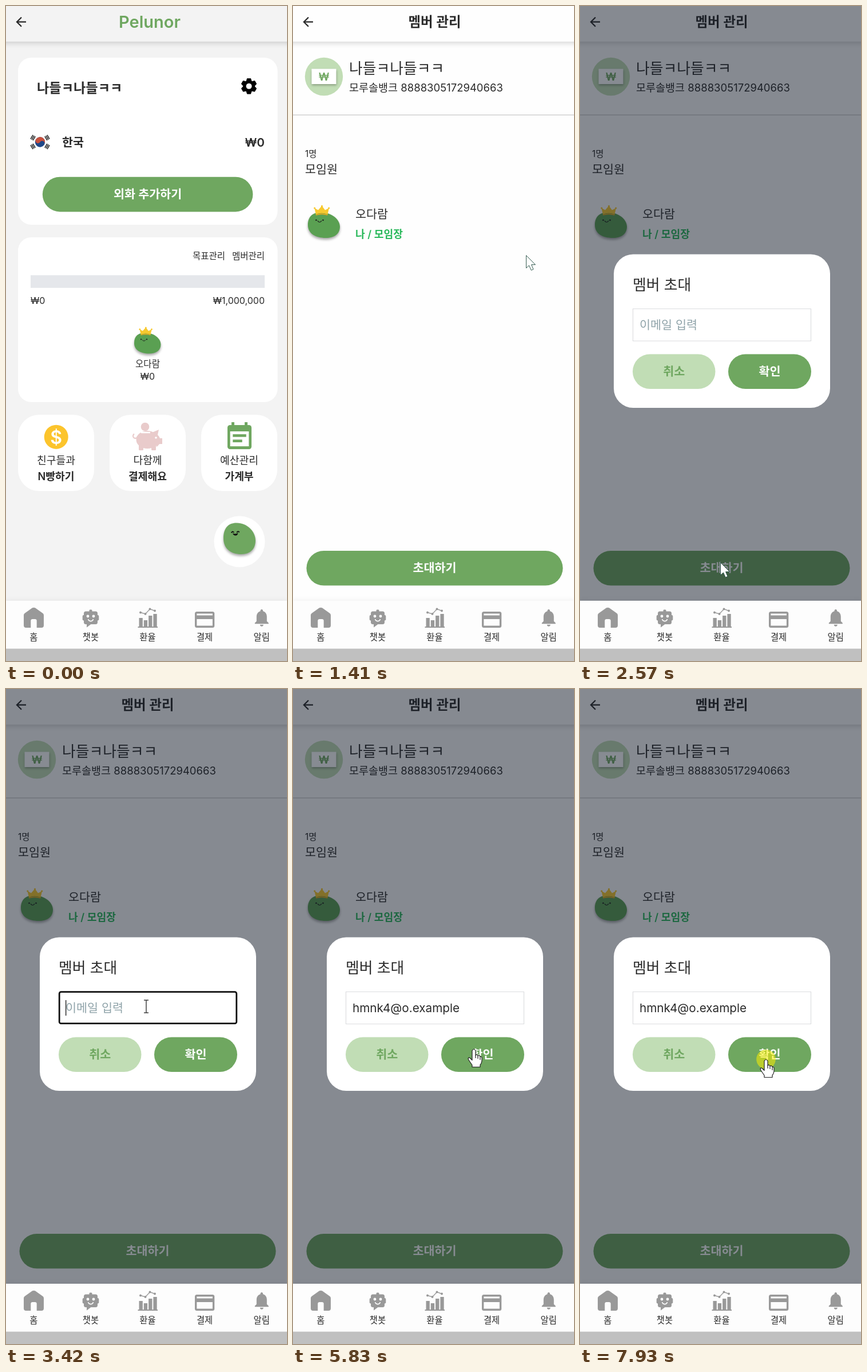
Recreate the animation shown at these times as an HTML page with a canvas. Size 491x1141 px, loop 8000 ms.

```html
<!DOCTYPE html>
<html lang="ko">
<head>
<meta charset="utf-8">
<title>멤버 초대</title>
<style>
html, body { margin: 0; width: 100%; height: 100%; overflow: hidden; background: #fff; }
canvas { display: block; width: 491px; height: 1141px; }
</style>
</head>
<body>
<canvas id="stage"></canvas>
<script>
const W = 491, H = 1141, LOOP = 8000;
const canvas = document.getElementById('stage');
const c = canvas.getContext('2d');
const dpr = window.devicePixelRatio || 1;
canvas.width = W * dpr;
canvas.height = H * dpr;

const INK = '#2b2b2b', GREEN = '#6fa760', PALE = '#c1ddb5', GREY = '#999', GOLD = '#fcc42c';
const GROUP = '나들ㅋ나들ㅋㅋ', MEMBER = '오다람', EMAIL = 'hmnk4@o.example';
const FONT = 'Inter, "Noto Sans CJK KR", "Noto Sans CJK", sans-serif';

// Text is placed by the vertical middle of its glyphs.
function text(str, x, y, size, { bold = false, color = INK, align = 'left' } = {}) {
  c.font = `${bold ? 600 : 400} ${size}px ${FONT}`;
  c.textAlign = align;
  c.fillStyle = color;
  c.fillText(str, x, y + size * 0.37);
}

function rect(x, y, w, h, color, r = 0) {
  c.beginPath();
  c.roundRect(x, y, w, h, r);
  c.fillStyle = color;
  c.fill();
}

function circle(x, y, r, color) {
  c.beginPath();
  c.arc(x, y, r, 0, Math.PI * 2);
  c.fillStyle = color;
  c.fill();
}

function line(points, color, width) {
  c.beginPath();
  points.forEach(([x, y]) => c.lineTo(x, y));
  c.strokeStyle = color;
  c.lineWidth = width;
  c.stroke();
}

function shape(path, x, y, sx, sy, fill, stroke, width = 1) {
  c.save();
  c.translate(x, y);
  c.scale(sx, sy);
  const p = new Path2D(path);
  c.fillStyle = fill;
  c.fill(p);
  if (stroke) {
    c.strokeStyle = stroke;
    c.lineWidth = width;
    c.lineJoin = 'round';
    c.stroke(p);
  }
  c.restore();
}

function shadowed(color, blur, dy, draw) {
  c.save();
  c.shadowColor = color;
  c.shadowBlur = blur * dpr;
  c.shadowOffsetY = dy * dpr;
  draw();
  c.restore();
}

function pill(x, y, w, h, color, label, ink = '#fff') {
  rect(x, y, w, h, color, h / 2);
  text(label, x + w / 2, y + h / 2 - 0.5, 20.7, { bold: true, color: ink, align: 'center' });
}

function header(bg) {
  shadowed('rgba(0,0,0,.16)', 9, 3, () => rect(-10, -10, W + 20, 72, bg));
  line([[35, 27.7], [19.5, 27.7]], INK, 2.3);
  line([[27, 19.7], [19, 27.7], [27, 35.7]], INK, 2.3);
}

const BEAN = 'M0 .5C0 .16 .16 .01 .4 .01C.72 0 1 .27 1 .56C1 .85 .82 1 .56 1C.23 1 0 .82 0 .5Z';

function bean(x, y, w, h, color) {
  shadowed('rgba(0,0,0,.35)', 4, 3, () => shape(BEAN, x, y, w, h, color));
}

function crownedBean(x, y, w, h) {
  bean(x, y, w, h, '#5aa052');
  const u = w / 56;
  c.save();
  c.translate(x, y);
  c.scale(u, u);
  circle(14.5, 14, 1.3, '#1c1c1c');
  circle(26.5, 14, 1.3, '#1c1c1c');
  c.beginPath();
  c.arc(20.5, 14, 3.4, 0.3, Math.PI - 0.3);
  c.strokeStyle = '#1c1c1c';
  c.lineWidth = 1.1;
  c.stroke();
  shape('M14 4L11.5-7L18-3.5L24.5-11L30-3.5L37-7L34.5 4Q24-.5 14 4Z', 0, 0, 1, 1, '#f7c92f');
  [[11.8, -7], [24.5, -10.3], [36.7, -7]].forEach(([bx, by]) => circle(bx, by, 1.6, '#f7c92f'));
  c.beginPath();
  c.moveTo(14, 5);
  c.quadraticCurveTo(24, 1.5, 34.5, 5);
  c.strokeStyle = '#e5a91f';
  c.lineWidth = 1.8;
  c.stroke();
  c.restore();
}

function gear(x, y) {
  c.save();
  c.translate(x, y);
  circle(0, 0, 10, '#000');
  for (let i = 0; i < 6; i++) {
    c.rotate(Math.PI / 3);
    shape('M-4.6-8L-2.9-13.2H2.9L4.6-8Z', 0, 0, 1, 1, '#000', '#000', 1.2);
  }
  circle(0, 0, 5, '#fff');
  c.restore();
}

function flag(x, y) {
  c.save();
  c.translate(x, y);
  const tilt = 0.55;
  for (let i = 0; i < 4; i++) {
    c.save();
    c.rotate([tilt, -tilt, Math.PI + tilt, Math.PI - tilt][i]);
    for (let k = 0; k < 3; k++) rect(11.5 + k * 2.4, -4, 1.4, 8, '#111');
    c.restore();
  }
  c.rotate(tilt);
  circle(0, 0, 8.7, '#1f4788');
  c.beginPath();
  c.arc(0, 0, 8.7, Math.PI, 0);
  c.arc(4.35, 0, 4.35, 0, Math.PI, true);
  c.arc(-4.35, 0, 4.35, 0, Math.PI);
  c.fillStyle = '#c8503c';
  c.fill();
  c.restore();
}

function piggy() {
  const pink = '#e9cbcb';
  circle(243, 733, 7.3, pink);
  c.beginPath();
  c.ellipse(247, 755.5, 19.5, 15.5, 0, 0, Math.PI * 2);
  c.fill();
  shape('M255 743L267 738L265 747Q268 750 269 753H273V763H268Q266 766 263 768Z', 0, 0, 1, 1, pink);
  rect(232, 763, 8, 11, pink, 1.5);
  rect(254, 763, 8, 11, pink, 1.5);
  c.beginPath();
  c.arc(226, 749, 4, 0.2, 4.2);
  c.strokeStyle = pink;
  c.lineWidth = 2.2;
  c.stroke();
  line([[236, 743], [252, 743]], '#fff', 2.4);
  circle(262, 752, 1.8, '#fff');
}

function planner() {
  rect(387, 730, 42, 42, GREEN, 4.5);
  rect(394, 725, 5, 8, GREEN);
  rect(417, 725, 5, 8, GREEN);
  rect(391.7, 741, 32.6, 26, '#fff');
  rect(396.3, 746, 23.4, 4.7, GREEN);
  rect(396.3, 755.3, 16.4, 4.7, GREEN);
}

function tile(x, top, bottom) {
  rect(x, 712, 133, 133, '#fff', 37);
  text(top, x + 66.5, 791, 18.2, { align: 'center' });
  text(bottom, x + 66.5, 819, 18.2, { bold: true, align: 'center' });
}

function homePage() {
  rect(0, 0, W, 1036, '#f3f3f3');
  header('#f3f3f3');
  text('Pelunor', 251, 27, 29, { bold: true, color: GREEN, align: 'center' });

  rect(21, 90, 453.5, 291, '#fff', 23);
  text(GROUP, 54, 142, 23.2, { bold: true });
  gear(424.5, 139.7);
  flag(59.5, 237);
  text('한국', 98, 237, 20.7, { bold: true });
  text('₩0', 452, 237, 20.7, { bold: true, align: 'right' });
  pill(63.8, 297.8, 367.6, 60.6, GREEN, '외화 추가하기');

  rect(21, 403, 453.5, 287, '#fff', 23);
  text('목표관리', 326, 435.5, 15.5);
  text('멤버관리', 452, 435.5, 15.5, { align: 'right' });
  rect(43, 469, 409, 22, '#e5e7eb');
  text('₩0', 43, 513, 16);
  text('₩1,000,000', 452, 513, 16, { align: 'right' });
  crownedBean(224, 569, 46.5, 36.5);
  text(MEMBER, 247.5, 623.5, 15.5, { align: 'center' });
  text('₩0', 247.5, 645.5, 16, { align: 'center' });

  tile(21, '친구들과', 'N빵하기');
  circle(87.7, 750.7, 21, GOLD);
  text('$', 87.7, 750.7, 32, { bold: true, color: '#fff', align: 'center' });
  tile(181, '다함께', '결제해요');
  piggy();
  tile(341, '예산관리', '가계부');
  planner();

  circle(408, 933, 44.5, '#fff');
  bean(380, 900, 56, 55, GREEN);
  line([[393.5, 917.5], [396, 915.5], [398.5, 917]], '#111', 1.8);
  line([[403, 917], [405.5, 915.2], [408, 916.5]], '#111', 1.8);
  shape('M396 918.5Q401 920.5 405.5 918Q404.5 922.5 401 922.5Q397.5 922.5 396 918.5Z', 0, 0, 1, 1, '#111');
}

function memberPage() {
  rect(0, 0, W, 1036, '#fefefe');
  header('#fefefe');
  text('멤버 관리', 247.5, 27, 23.4, { bold: true, align: 'center' });
  circle(54, 123, 33.2, PALE);
  shadowed('rgba(0,0,0,.3)', 4, 2, () => rect(32.5, 109.5, 43, 26.5, '#fff'));
  text('₩', 54, 123, 18.5, { bold: true, color: GREEN, align: 'center' });
  text(GROUP, 98, 108.5, 25.8);
  text('모루솔뱅크 8888305172940663', 98, 142, 18.5);
  rect(0, 189, W, 1.4, '#d2d2d2');
  text('1명', 21, 257, 15.5);
  text('모임원', 21, 284.5, 20.7);
  crownedBean(26, 359, 56, 45);
  text(MEMBER, 109, 362, 20.7);
  text('나 / 모임장', 109, 397.5, 18.2, { bold: true, color: '#2bb95c' });
  pill(23.5, 949, 448, 60.5, GREEN, '초대하기');
}

function inviteDialog(t) {
  const focused = t >= 3260 && t < 4430;
  rect(0, 0, W, 1036, 'rgba(17,24,39,.5)');
  rect(59, 432.5, 378, 267.5, '#fff', 34);
  text('멤버 초대', 92, 485, 25.8);
  c.beginPath();
  if (focused) c.roundRect(93.2, 527.7, 309.6, 55, 3);
  else c.rect(92.5, 527.5, 311, 56);
  c.strokeStyle = focused ? '#101010' : '#dcdde0';
  c.lineWidth = focused ? 2.8 : 1.2;
  c.stroke();

  const typed = EMAIL.slice(0, Math.ceil(Math.max(0, Math.min(1, (t - 3660) / 130)) * EMAIL.length));
  if (typed) text(typed, 104, 555, 20.7);
  else text('이메일 입력', 104, 555, 20.7, { color: '#8fa3a9' });
  if (focused && t < 4290) {
    c.font = `400 20.7px ${FONT}`;
    rect(104 + c.measureText(typed).width, 542, 1.3, 27, '#111');
  }
  pill(92, 606.5, 144.5, 60.5, PALE, '취소', GREEN);
  pill(259, 606.5, 145, 60.5, GREEN, '확인');
}

const BELL = 'M12 22c1.1 0 2-.9 2-2h-4c0 1.1.9 2 2 2zm6-6v-5c0-3.07-1.63-5.64-4.5-6.32V4c0-.83-.67-1.5-1.5-1.5s-1.5.67-1.5 1.5v.68C7.64 5.36 6 7.92 6 11v5l-2 2v1h16v-1l-2-2z';

function navBar() {
  const bg = '#fdfdfd';
  shadowed('rgba(0,0,0,.05)', 8, -2, () => rect(0, 1036, W, 84, bg));
  rect(0, 1119.5, W, 22, '#c0c0c0');
  ['홈', '챗봇', '환율', '결제', '알림'].forEach((label, i) =>
    text(label, 48.3 + i * 99.6, 1099.5, 15.4, { align: 'center' }));

  shape('M33 1061Q33 1060 34 1059.3L46 1050.8Q48.5 1049.2 51 1050.8L63 1059.3Q64 1060 64 1061V1079Q64 1081 62 1081H35Q33 1081 33 1079Z', 0, 0, 1, 1, GREY, GREY, 4);
  rect(43.3, 1068, 10.4, 16, bg, [3, 3, 0, 0]);

  rect(136, 1054.5, 24, 22.5, GREY, 3.5);
  rect(133.7, 1061, 28.6, 9.5, GREY, 2);
  rect(145.5, 1051.5, 5, 5, GREY, 1.5);
  shape('M141 1075H151L141 1082.5Z', 0, 0, 1, 1, GREY);
  circle(143, 1063, 2.4, bg);
  circle(153, 1063, 2.4, bg);
  c.beginPath();
  c.arc(148, 1067, 4.6, 0.25, Math.PI - 0.25);
  c.strokeStyle = bg;
  c.lineWidth = 1.8;
  c.stroke();

  [1066, 1070, 1062, 1059].forEach((y, i) => rect(232.5 + i * 8.3, y, 6.3, 1082 - y, GREY));
  rect(230.5, 1081, 34.5, 2, GREY);
  const trend = [[235, 1056.5], [243.5, 1059], [251.5, 1050.5], [260, 1053.5]];
  line(trend, GREY, 1.4);
  trend.forEach(([x, y]) => circle(x, y, 2, GREY));

  rect(330, 1055, 34.3, 28, GREY, 3.5);
  rect(333.4, 1058.5, 27.5, 3, bg);
  rect(333.4, 1068, 27.5, 11.5, bg);

  shape(BELL, 428.8, 1047.2, 1.5, 1.53, GREY);
}

// Pointer moves: start, end, from, to.
const MOVES = [
  [120, 740, [480, 1080], [407, 434]],
  [1720, 2340, [407, 434], [245, 969]],
  [2720, 2950, [245, 969], [231, 493]],
  [3060, 3260, [231, 493], [245, 553]],
  [3860, 4090, [245, 553], [313, 618]],
  [5780, 5830, [313, 618], [316, 627]],
  [5830, 6440, [316, 627], [321, 653]],
  [7340, 7380, [321, 653], [322, 652]],
  [7540, 7720, [322, 652], [325, 645]]
];
const CLICKS = [[960, 1220], [2430, 2570], [3260, 3420], [4430, 4760], [7930, 8000]];

function pointerAt(t) {
  const move = MOVES.filter(m => t >= m[0]).pop();
  if (!move) return null;
  const [start, end, from, to] = move;
  const p = Math.min(1, (t - start) / (end - start));
  const e = p * p * (3 - 2 * p);
  return from.map((v, i) => v + (to[i] - v) * e);
}

function cursorKind(t, x, y) {
  const inside = (l, top, r, b) => x >= l && x <= r && y >= top && y <= b;
  if (t < 1220) {
    const hot = inside(395, 425, 452, 446) || inside(341, 712, 474, 845) ||
      inside(364, 889, 452, 977) || y > 1040;
    return hot ? 'hand' : 'arrow';
  }
  if (t < 2570) return inside(24, 949, 471, 1009) ? 'hand' : 'arrow';
  if (inside(92, 527, 404, 584)) return 'beam';
  return inside(259, 607, 404, 667) ? 'hand' : 'arrow';
}

const ARROW = 'M.5.5V22.5L5.5 18L9.2 26.3L13 24.7L9.6 16.6H16.5Z';
const HAND = 'M-3 3Q0-2 3 3V11Q5.5 8.5 7 12Q9.8 10 11 13.5Q13.8 12.5 14 16V21Q13.5 25 11 28V31.5H-3V28L-9.5 18.5Q-10.5 14 -7 15.5L-3 19.5Z';

function pointer(t) {
  const pos = pointerAt(t);
  if (!pos) return;
  const [x, y] = pos;
  if (CLICKS.some(([a, b]) => t >= a && t < b)) circle(x, y, 16.8, 'rgba(252,238,0,.54)');
  const kind = cursorKind(t, x, y);
  if (kind === 'arrow') {
    shape(ARROW, x, y, 1, 1, '#fff', '#1f4a3e', 0.9);
  } else if (kind === 'hand') {
    shape(HAND, x, y, 1, 1, '#fff', '#222', 1.2);
    [[3, 11], [7, 12], [11, 14]].forEach(([dx, dy]) =>
      line([[x + dx, y + dy], [x + dx, y + dy + 5]], '#222', 1.2));
  } else {
    line([[x, y - 11], [x, y + 11]], '#222', 1.3);
    line([[x - 4, y - 11], [x + 4, y - 11]], '#222', 1.3);
    line([[x - 4, y + 11], [x + 4, y + 11]], '#222', 1.3);
  }
}

function render(t) {
  c.setTransform(dpr, 0, 0, dpr, 0, 0);
  c.globalAlpha = 1;
  rect(0, 0, W, H, '#fff');
  const fade = t < 1220 ? 0 : Math.min(1, (t - 1140) / 260);
  if (fade < 1) homePage();
  if (fade > 0) {
    c.globalAlpha = fade;
    memberPage();
    c.globalAlpha = 1;
  }
  if (t >= 2570) inviteDialog(t);
  navBar();
  pointer(t);
}

const begin = performance.now();
function tick() {
  render((performance.now() - begin) % LOOP);
  requestAnimationFrame(tick);
}
tick();
</script>
</body>
</html>
```
